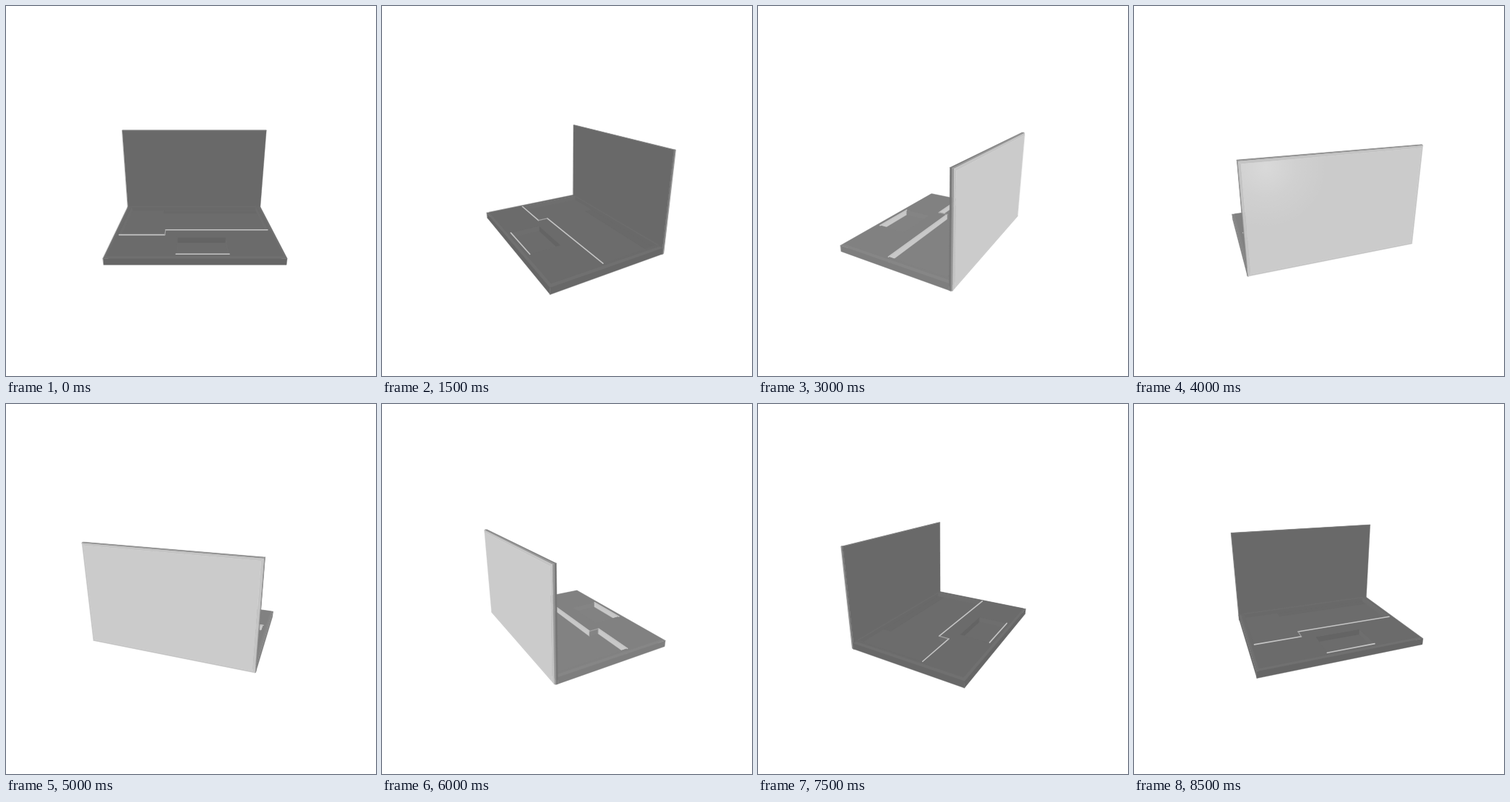
Animation, 512 px wide and 512 px high, one loop 9 s. Source, as an HTML page with a canvas:

```html
<!DOCTYPE html>
<html lang="en">
<head>
<meta charset="utf-8">
<title>Turntable</title>
<style>
  html, body { margin: 0; width: 100%; height: 100%; overflow: hidden; background: #fff; }
  canvas { display: block; width: 100vmin; height: 100vmin; }
</style>
</head>
<body>
<canvas width="512" height="512"></canvas>
<script>
const ctx = document.querySelector('canvas').getContext('2d');
ctx.lineJoin = ctx.lineCap = 'round';

// Camera: 60 degree field of view, 20 degrees above the model, at distance 1.
const FOCAL = 257 / Math.tan(Math.PI / 6);
const CENTER_U = 256.6, CENTER_V = 256.9;
const CAM_SIN = Math.sin(Math.PI / 9), CAM_COS = Math.cos(Math.PI / 9);
const STEPS = 18, STEP_MS = 500;

// Model measures; x is right, y is up, z is towards the front.
const LEFT = -0.236, RIGHT = 0.2556, FRONT = 0.194;
const BOTTOM = -0.139, FLOOR = -0.134, RIM = -0.119, DECK = -0.116, LID_TOP = 0.163;
const LID_FRONT = -0.163, LID_EDGE = -0.168, LID_ROUND = -0.172, LID_BACK = -0.174;
const WELL = [[-0.22, LID_FRONT], [0.239, LID_FRONT], [0.239, 0.032],
              [-0.081, 0.032], [-0.081, 0.065], [-0.22, 0.065]];
const PAD = [[-0.042, 0.081], [0.103, 0.081], [0.103, 0.177], [-0.042, 0.177]];

let turnSin = 0, turnCos = 1;

function project([x, y, z]) {
  const side = x * turnCos - z * turnSin;
  const near = x * turnSin + z * turnCos;
  const scale = FOCAL / (1 - near * CAM_COS - y * CAM_SIN);
  return [CENTER_U + side * scale, CENTER_V - (y * CAM_COS - near * CAM_SIN) * scale];
}

const gray = value => `rgb(${value},${value},${value})`;

// The base looks brighter when seen from behind.
const baseGray = value => gray(Math.round(value + 22 * Math.min(1, Math.max(0, -2 * turnCos))));

function trace(points) {
  points.map(project).forEach(([u, v], i) => i ? ctx.lineTo(u, v) : ctx.moveTo(u, v));
  ctx.closePath();
}

function fill(color, ...outlines) {
  ctx.beginPath();
  outlines.forEach(trace);
  ctx.fillStyle = ctx.strokeStyle = color;
  ctx.fill('evenodd');
  ctx.lineWidth = 0.4;
  ctx.stroke();
}

function line(color, width, a, b) {
  ctx.beginPath();
  ctx.moveTo(...project(a));
  ctx.lineTo(...project(b));
  ctx.strokeStyle = color;
  ctx.lineWidth = width;
  ctx.stroke();
}

// Faces list their corners clockwise as seen from outside.
function face(color, points) {
  const p = points.map(project);
  const area = p.reduce((sum, [u, v], i) => {
    const [nu, nv] = p[(i + 1) % p.length];
    return sum + u * nv - nu * v;
  }, 0);
  if (area > 0) fill(color, points);
  return area > 0;
}

const level = (outline, y) => outline.map(([x, z]) => [x, y, z]);
const rect = (x0, x1, z0, z1) => [[x0, z0], [x1, z0], [x1, z1], [x0, z1]];

function hollow(outline) {
  const top = level(outline, DECK), low = level(outline, FLOOR);
  outline.forEach(([x, z], i) => {
    const j = (i + 1) % outline.length;
    const [nx, nz] = outline[j];
    if (z === LID_FRONT && nz === z) return;
    const color = nx < x ? gray(200) : baseGray(nx > x ? 100 : 110);
    face(color, [top[i], top[j], low[j], low[i]]);
  });
}

function ridges(outline) {
  outline.forEach(([x, z], i) => {
    const [nx, nz] = outline[(i + 1) % outline.length];
    if (nx < x) line(gray(196), 1.6, [x, DECK, z], [nx, DECK, nz]);
  });
}

function drawBase() {
  fill(baseGray(108), level(rect(LEFT + 0.008, RIGHT - 0.008, LID_FRONT, FRONT - 0.008), FLOOR));
  fill(baseGray(105), level(rect(-0.1, 0.239, LID_FRONT, -0.136), FLOOR));
  hollow(WELL);
  hollow(PAD);

  const outer = rect(LEFT, RIGHT, LID_FRONT, FRONT);
  const top = level(outer, RIM), low = level(outer, BOTTOM);
  [[1, 2, 104], [2, 3, 102], [3, 0, 104]].forEach(([i, j, value]) =>
    face(baseGray(value), [top[j], top[i], low[i], low[j]]));

  const deck = rect(LEFT + 0.008, RIGHT - 0.008, LID_FRONT, FRONT - 0.007);
  fill(baseGray(112), top, level(WELL, DECK), level(PAD, DECK));
  fill(baseGray(107), level(deck, DECK), level(WELL, DECK), level(PAD, DECK));
  ridges(WELL);
  ridges(PAD);
  line(gray(160), 1.2, [-0.081, DECK, 0.032], [-0.081, DECK, 0.065]);
}

// Soft reflection of a light behind and below the model, mirrored in the lid.
function drawGlow(panel) {
  const reach = LID_BACK - turnCos * CAM_COS;
  const x = turnSin * CAM_COS - 0.18 * reach;
  const y = CAM_SIN - 0.28 * reach;
  const [u, v] = project([x, y, LID_BACK]);
  const glow = ctx.createRadialGradient(u, v, 0, u, v, 85);
  glow.addColorStop(0, 'rgba(255,255,255,0.28)');
  glow.addColorStop(0.5, 'rgba(255,255,255,0.1)');
  glow.addColorStop(1, 'rgba(255,255,255,0)');
  ctx.beginPath();
  trace(panel);
  ctx.fillStyle = glow;
  ctx.fill();
}

function drawLid() {
  const frame = (z, inset) => [
    [LEFT + inset, LID_TOP - inset, z], [RIGHT - inset, LID_TOP - inset, z],
    [RIGHT - inset, BOTTOM + inset, z], [LEFT + inset, BOTTOM + inset, z]];
  const front = frame(LID_FRONT, 0), edge = frame(LID_EDGE, 0);
  const round = frame(LID_ROUND, 0.0015), back = frame(LID_BACK, 0.007);
  const band = (a, b, value) => a.forEach((_, i) => {
    const j = (i + 1) % 4;
    face(gray(value), [a[j], a[i], b[i], b[j]]);
  });
  band(front, edge, 118);
  band(edge, round, 150);
  band(round, back, 196);
  face(gray(105), front);
  const panel = [...back].reverse();
  if (face(gray(203), panel)) drawGlow(panel);
}

function render(now) {
  const step = Math.floor(now / STEP_MS) % STEPS;
  const angle = step * 2 * Math.PI / STEPS;
  turnSin = Math.sin(angle);
  turnCos = Math.cos(angle);
  ctx.fillStyle = '#fff';
  ctx.fillRect(0, 0, 512, 512);
  const parts = [drawLid, drawBase];
  if (turnCos * CAM_COS < LID_FRONT) parts.reverse();
  parts.forEach(draw => draw());
}

const start = performance.now();
function tick() {
  render(performance.now() - start);
  requestAnimationFrame(tick);
}
tick();
</script>
</body>
</html>
```
